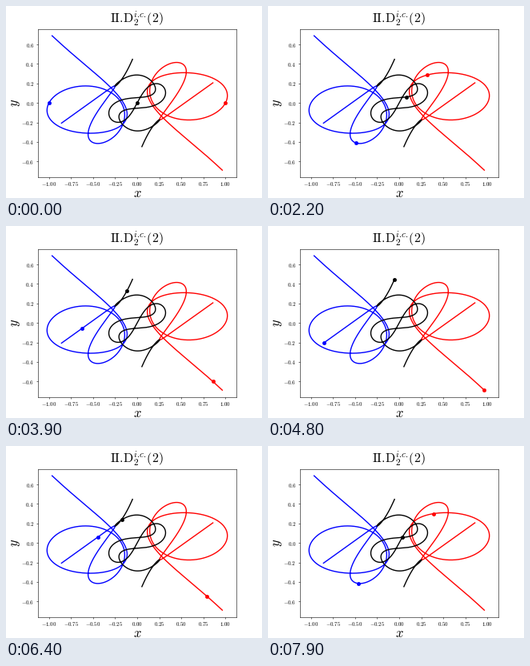
Recreate the animation shown at these times as a matplotlib script. Size 320 px wide and 240 px high, loop 8000 ms.

```python
import numpy as np
import matplotlib.pyplot as plt
from matplotlib.animation import FuncAnimation

WIDTH, HEIGHT, DPI = 320, 240, 50
FRAMES, INTERVAL = 80, 100
TIME_STEP = 0.044            # simulated time per frame
PERIOD = 8.8237067653
VELOCITY = 0.3057224330 + 0.5215124257j
MASSES = np.array([1.0, 1.0, 2.0])
COLORS = ["blue", "red", "black"]

plt.rcParams["mathtext.fontset"] = "cm"


def derivative(state):
    z, v = state
    gap = z[None, :] - z[:, None]
    dist = np.abs(gap) + np.eye(3)
    return np.array([v, (MASSES * gap / dist**3).sum(axis=1)])


def closest(z):
    return min(abs(z[0] - z[1]), abs(z[1] - z[2]), abs(z[2] - z[0]))


def integrate(duration, accuracy=0.005):
    """Runge-Kutta track in the complex plane; steps shrink in close encounters."""
    state = np.array([[-1, 1, 0], [VELOCITY, VELOCITY, -VELOCITY]], complex)
    t, times, track = 0.0, [0.0], [state[0]]
    while duration - t > 1e-9:
        h = min(accuracy * closest(state[0])**1.5, duration - t)
        k1 = derivative(state)
        k2 = derivative(state + h / 2 * k1)
        k3 = derivative(state + h / 2 * k2)
        k4 = derivative(state + h * k3)
        state = state + h / 6 * (k1 + 2 * k2 + 2 * k3 + k4)
        t += h
        times.append(t)
        track.append(state[0])
    return np.array(times), np.array(track).T


# All bodies come to rest after a quarter period and then retrace their paths.
REST = PERIOD / 4
times, track = integrate(REST)
# Reversing time equals a half turn that swaps the two light bodies.
past = -track[[1, 0, 2], ::-1]
orbits = np.concatenate([past, track[:, 1:]], axis=1)


def position(body, t):
    return np.interp(REST - abs(REST - t), times, track[body])


fig, ax = plt.subplots(figsize=(WIDTH / DPI, HEIGHT / DPI), dpi=DPI)
for orbit, color in zip(orbits, COLORS):
    ax.plot(orbit.real, orbit.imag, color=color, lw=2)
dots = [ax.plot([], [], "o", color=color, ms=6)[0] for color in COLORS]

x_ticks = np.arange(-4, 5) / 4
y_ticks = np.arange(-3, 4) / 5
ax.set_xticks(x_ticks, [f"${v:.2f}$" for v in x_ticks])
ax.set_yticks(y_ticks, [f"${v:.1f}$" for v in y_ticks])


def label(x, y, text, size=24, **style):
    fig.text(x / WIDTH, 1 - y / HEIGHT, text, size=size, ha="center",
             va="baseline", rotation_mode="anchor", **style)


label(163.5, 21, r"$\mathrm{II.\!D}_2^{i.\!c.\!}(2)$", size=23)
label(164, 239, "$x$")
label(15.5, 121, "$y$", rotation=90)


def update(frame):
    for body, dot in enumerate(dots):
        z = position(body, frame * TIME_STEP)
        dot.set_data([z.real], [z.imag])
    return dots


anim = FuncAnimation(fig, update, frames=FRAMES, interval=INTERVAL,
                     repeat=True, repeat_delay=0)
plt.show()
```
